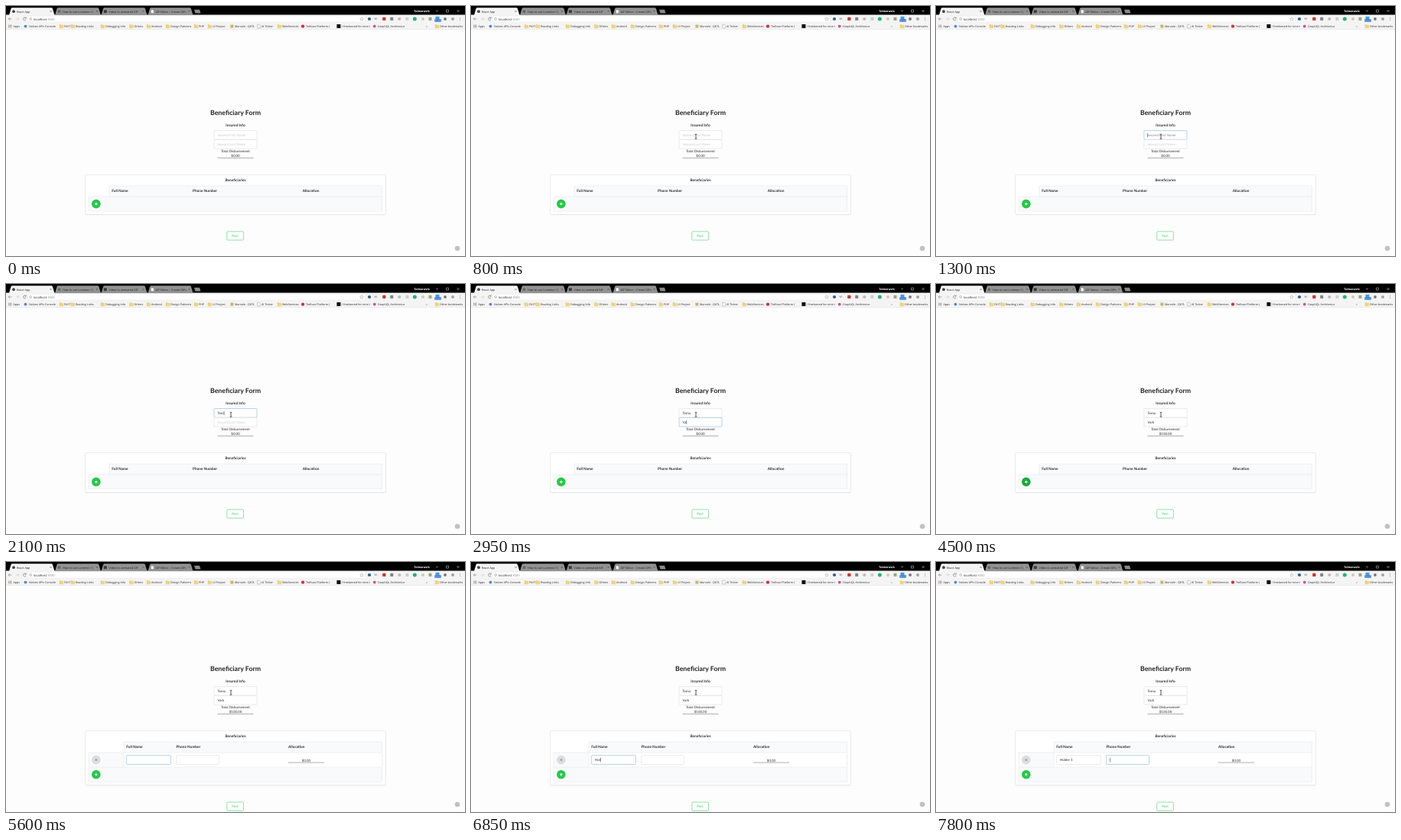
These frames come from a looping animation (600x328 px, 8 s). An HTML page:

```html
<!DOCTYPE html>
<html lang="en">
<head>
<meta charset="utf-8">
<title>Beneficiary Form</title>
<style>
  html, body { margin: 0; width: 100%; height: 100%; overflow: hidden; background: #fdfdfd; }
  svg { display: block; width: 100%; height: 100%; text-rendering: geometricPrecision; }
  .ui { font: 3.7px "Open Sans", "Noto Sans", sans-serif; }
  .page { font: 4.45px Lato, sans-serif; }
  .bold { font-size: 4.75px; font-weight: 700; }
</style>
</head>
<body>
<svg id="stage" viewBox="0 0 600 328" xmlns="http://www.w3.org/2000/svg"></svg>
<script>
const NS = 'http://www.w3.org/2000/svg';
const LOOP = 8000, BLINK = 280, FADE = 100;
const INK = '#2b2b2b', GREEN = '#21ca45', LINE = '#dededf', FOCUS = '#85b7d9';
const stage = document.getElementById('stage');

function el(parent, tag, attrs = {}, text) {
  const node = document.createElementNS(NS, tag);
  set(node, attrs);
  if (text !== undefined) node.textContent = text;
  parent.appendChild(node);
  return node;
}
function set(node, attrs) {
  for (const key in attrs) node.setAttribute(key, attrs[key]);
}
const group = (parent, cls) => el(parent, 'g', cls ? { class: cls } : {});
const rect = (p, x, y, width, height, fill, more) => el(p, 'rect', { x, y, width, height, fill, ...more });
const circle = (p, cx, cy, r, fill, more) => el(p, 'circle', { cx, cy, r, fill, ...more });
const path = (p, d, stroke, width = 0.6, fill = 'none') =>
  el(p, 'path', { d, stroke, fill, 'stroke-width': width });
const label = (p, x, y, text, fill = INK, more) => el(p, 'text', { x, y, fill, ...more }, text);
const middle = { 'text-anchor': 'middle' };

function drawFolder(p, x, y) {
  path(p, `M${x} ${y - 2}h1.7l.6 .7h2.4v3.6h-4.7z`, '#d9b550', 0.3, '#f6d36f');
}
function drawSheet(p, x, y) {
  path(p, `M${x} ${y - 2.3}h2.4l1.2 1.2v3.4h-3.6z`, '#777', 0.4, '#fff');
}

function drawTab(p, x, width, title, active) {
  path(p, `M${x} 12l2.6 -8.6q.5 -1.2 1.6 -1.2h${width - 8.4}q1.1 0 1.6 1.2l2.6 8.6z`, 'none', 0,
    active ? '#f4f4f4' : '#929292');
  label(p, x + 10, 8.5, title, '#1d1d1d');
  const cx = x + width - 5;
  path(p, `M${cx - 1} 6l2 2m0 -2l-2 2`, '#444', 0.45);
}

function drawBrowser() {
  const g = group(stage, 'ui');
  rect(g, 0, 0, 600, 12, '#000');
  rect(g, 0, 11.5, 600, 19.5, '#f4f4f4');
  rect(g, 0, 30.6, 600, 0.4, '#dcdcdc');

  drawTab(g, 64, 60, 'How to use Lumeron 1(');
  drawTab(g, 124.5, 60, 'Video to animated GIF');
  drawTab(g, 185.5, 59, 'GIF Editor – Create GIFs');
  drawTab(g, 4, 59.5, 'React App', true);
  circle(g, 10, 7.2, 1.9, '#3c464c');
  circle(g, 69.5, 7.2, 1.9, '#666');
  rect(g, 127.8, 5.3, 4, 3.8, '#3b3b3b');
  drawSheet(g, 189.5, 7.2);
  path(g, 'M246 4.8h7l1.5 4.7h-7z', 'none', 0, '#888');
  label(g, 543.5, 8, 'Tolmeravik', '#fff', { ...middle, 'font-weight': 700 });
  path(g, 'M562 6.5h3M575.5 5h3v3h-3zM589.5 5l3 3m0 -3l-3 3', '#ddd', 0.5);

  // Navigation row
  rect(g, 28.5, 13.2, 441, 7.7, '#fff', { rx: 1, stroke: '#e1e1e1', 'stroke-width': 0.3 });
  path(g, 'M7.4 17h-4m1.6 -1.7l-1.7 1.7 1.7 1.7', '#777', 0.6);
  path(g, 'M13 17h4m-1.6 -1.7l1.7 1.7 -1.7 1.7', '#c4c4c4', 0.6);
  path(g, 'M25.9 15.8a1.9 1.9 0 1 0 .1 2.3M26.2 14.6v1.6h-1.6', '#666', 0.6);
  circle(g, 32.2, 17, 1.6, 'none', { stroke: '#777', 'stroke-width': 0.4 });
  path(g, 'M32.2 16.7v1.2m0 -2v.4', '#777', 0.4);
  const url = label(g, 36, 18.5, 'localhost', '#222', { 'font-size': 4.1 });
  el(url, 'tspan', { fill: '#8a8a8a' }, ':3000');
  path(g, 'M465 14.7l.7 1.5 1.7.2 -1.2 1.1 .3 1.6 -1.5 -.8 -1.5.8 .3 -1.6 -1.2 -1.1 1.7 -.2z', '#777', 0.35);
  circle(g, 475, 17, 2.1, '#2e5f8f');
  label(g, 481.5, 18.3, 'W.', '#555');
  rect(g, 492.2, 14.8, 4.2, 4.2, '#c9372c', { rx: 0.6 });
  rect(g, 502.2, 14.8, 4, 4.2, '#858585', { rx: 0.6 });
  circle(g, 514.3, 17, 2.1, '#bdbdbd');
  rect(g, 522.4, 14.8, 4, 4.2, '#cfcfcf', { rx: 0.6 });
  circle(g, 534.3, 17, 2.5, '#21b573');
  circle(g, 545, 17, 2, '#cbc9b8');
  rect(g, 552.5, 14.8, 4, 4.2, '#9ea67e', { rx: 0.6 });
  rect(g, 561.5, 13.8, 5, 4, '#4a9ae0');
  rect(g, 560.3, 17.2, 8.5, 3.6, '#2b7cd3', { rx: 0.5 });
  label(g, 564.5, 20.1, '10:12', '#fff', { ...middle, 'font-size': 2.7 });
  circle(g, 574, 17, 1.9, '#777');
  circle(g, 584, 17, 2, '#a3a3a3');
  for (const y of [15.2, 17, 18.8]) circle(g, 593.5, y, 0.45, '#555');

  // Bookmarks
  const marks = [
    [9.5, 'Apps'], [30, 'Nolvex APIs Console'], [76, 'FAST', 1], [91, 'Reading Links', 1],
    [130, 'Debugging Info', 1], [167.5, 'Others', 1], [190, 'Android', 1],
    [215, 'Design Patterns', 1], [252, 'PHP', 1], [270, 'UI Project', 1],
    [299, 'Marvole - QKTL'], [334, 'AI Tinker'], [361, 'WebServices', 1],
    [392, 'Trellvue Platform ('], [439, 'I freelanced for nine t'],
    [486, 'GraphQL Architectur'], [567, 'Other bookmarks', 1]
  ];
  for (const [x, text, folder] of marks) {
    label(g, x, 27.9, text);
    if (folder) drawFolder(g, x - 6, 26.5);
  }
  const dots = ['#d84b40', '#e0a52b', '#3f86d8'];
  for (let i = 0; i < 9; i++) rect(g, 3.4 + i % 3 * 1.4, 24.7 + Math.floor(i / 3) * 1.4, 1, 1, dots[i % 3]);
  circle(g, 25.5, 26.6, 1.9, '#4c86dc');
  rect(g, 293.4, 24.6, 3.9, 4, '#c9b75c');
  drawSheet(g, 328.8, 26.6);
  circle(g, 388, 26.6, 2.2, '#d2323c');
  rect(g, 432.4, 24, 5, 5, '#111');
  circle(g, 481.7, 26.6, 1.9, '#d4489c');
  label(g, 549, 28, '»', '#555');
}

function makeInput(p, x, y, width, height, hint = '') {
  const box = rect(p, x, y, width, height, '#fff', { rx: 0.9, 'stroke-width': 0.6 });
  const base = y + height / 2 + 1.6;
  return {
    box, hint, left: x + 4.5,
    text: label(p, x + 4.5, base, ''),
    caret: rect(p, 0, base - 4.4, 0.5, 5.6, '#222')
  };
}
function makeMoney(p, cx, base) {
  return {
    cx,
    rule: rect(p, cx - 23.5, base + 1.2, 47, 0.6, '#777'),
    text: label(p, cx, base, '$0.00', INK, middle),
    caret: rect(p, 0, base - 4.2, 0.5, 5, '#222')
  };
}

function drawTable(left, rows, columns) {
  const g = group(stage, 'page');
  const end = 250 + rows * 19.2;
  rect(g, 104, 222, 392.4, end + 5 - 222, '#ececed', { rx: 1 });
  rect(g, 103.7, 221.5, 392.6, end + 4.4 - 221.5, '#fff', { rx: 1, stroke: '#d9d9da', 'stroke-width': 0.5 });
  label(g, 300, 230, 'Beneficiaries', INK, { ...middle, class: 'bold' });
  rect(g, left, 236, 491.5 - left, 14, '#f9fafb');
  rect(g, 108, 250, 383.5, end - 250, '#f9fafb');
  if (rows > 1) rect(g, left, 250, 491.5 - left, 19.2, '#fff');
  path(g, `M${left} 250V236H491.5V${end}H108V250H491.5`, '#dfe0e1', 0.45);
  if (rows > 1) path(g, `M108 269.2H491.5M${left} 250V269.2`, '#dfe0e1', 0.45);
  ['Full Name', 'Phone Number', 'Allocation'].forEach((name, i) =>
    label(g, columns[i], 244.4, name, INK, { class: 'bold' }));

  const cy = end - 9.6;
  const add = circle(g, 117.8, cy, 5.8, GREEN);
  path(g, `M115.9 ${cy}h3.8m-1.9 -1.9v3.8`, '#fff', 1.1);

  const py = end + 26.7;
  rect(g, 288.8, py, 21.6, 11.2, '#fff', { rx: 1, stroke: '#62d67d', 'stroke-width': 0.7 });
  label(g, 299.6, py + 7.2, 'Post', '#42c963', middle);
  return { g, add };
}

drawBrowser();
const form = group(stage, 'page');
label(form, 300, 142.6, 'Beneficiary Form', '#222', { ...middle, 'font-size': 8.75, 'font-weight': 700 });
label(form, 300, 157.7, 'Insured Info', INK, { ...middle, class: 'bold' });

const empty = drawTable(135, 1, [138.3, 244, 387.8]);
const filled = drawTable(154, 2, [157.3, 222.4, 369]);
circle(filled.g, 117.8, 259.6, 5.8, '#dcdddf');
path(filled.g, 'M116.6 258.4l2.4 2.4m0 -2.4l-2.4 2.4', '#777', 0.9);

const fields = {
  first: makeInput(form, 272, 163.5, 56, 11.7, 'Insured First Name'),
  last: makeInput(form, 272, 175.4, 56, 11.7, 'Insured Last Name'),
  total: makeMoney(form, 300, 197.7),
  name: makeInput(filled.g, 157.4, 253.7, 58, 11.8),
  phone: makeInput(filled.g, 222.6, 253.7, 56, 11.8),
  alloc: makeMoney(filled.g, 392.5, 261.6)
};
label(form, 300, 191.7, 'Total Disbursement', INK, middle);
circle(stage, 590, 318, 3.3, '#c2c2c2');
const pointer = path(stage, 'M292.7 168.2q1.3 0 1.3 .8 0 -.8 1.3 -.8M294 169v4.6M292.7 174.4q1.3 0 1.3 -.8 0 .8 1.3 .8', '#111', 0.7);

// Start time, field, and optional caret phase
const focusSteps = [
  [1050, 'first'], [2650, 'last'], [3500, 'total'], [4400, 'add'],
  [5100, 'alloc'], [5200, 'phone'], [5310, 'name'], [7375, 'phone', 7240]
];
const typing = {
  first: { text: 'Temo', keys: [1850, 1950, 2050, 2200] },
  last: { text: 'Vark', keys: [2800, 2950, 3100, 3250] },
  total: { keys: [3650, 3800, 3900, 4050, 4150] },
  name: { text: 'Holder 1', keys: [6650, 6800, 6850, 6950, 7000, 7050, 7100, 7300] }
};
const rowTime = 4800, pointerTime = 800;

function mix(a, b, k) {
  const part = (hex, i) => parseInt(hex.slice(i, i + 2), 16);
  return `rgb(${[1, 3, 5].map(i => Math.round(part(a, i) + (part(b, i) - part(a, i)) * k))})`;
}

function focusAmount(id, time) {
  let amount = 0;
  focusSteps.forEach(([start, field], i) => {
    const next = focusSteps[i + 1];
    if (field !== id || time < start) return;
    const rise = Math.min(1, (time - start) / FADE);
    const fall = next ? Math.min(1, Math.max(0, (time - next[0]) / FADE)) : 0;
    amount = Math.max(amount, rise - fall);
  });
  return amount;
}

function render(time) {
  const step = focusSteps.filter(s => s[0] <= time).pop();
  for (const id in fields) {
    const f = fields[id];
    const { text = '', keys = [] } = typing[id] || {};
    const pressed = keys.filter(k => k <= time);
    const count = pressed.length;
    const amount = focusAmount(id, time);
    const focused = step && step[1] === id;

    if (f.box) {
      f.text.textContent = count ? text.slice(0, count) : f.hint;
      f.text.setAttribute('fill', count ? INK : mix('#c9c9c9', '#858585', amount));
      f.box.setAttribute('stroke', mix(LINE, FOCUS, amount));
    } else {
      f.text.textContent = '$' + (count ? 10 ** (count - 1) / 100 : 0).toFixed(2);
      set(f.rule, { fill: mix('#777777', '#21ba45', amount), height: 0.6 + 0.8 * amount });
    }

    const since = focused ? time - Math.max(step[2] || step[0], ...pressed) : 0;
    const on = focused && Math.floor(since / BLINK) % 2 === 0;
    f.caret.setAttribute('visibility', on ? 'inherit' : 'hidden');
    if (on) {
      const width = f.text.getComputedTextLength();
      const x = f.box ? f.left + (count ? width + (text[count - 1] === ' ' ? 1 : 0.2) : 0) : f.cx + width / 2 + 0.3;
      f.caret.setAttribute('x', x);
    }
  }
  const hasRow = time >= rowTime;
  empty.g.setAttribute('visibility', hasRow ? 'hidden' : 'visible');
  filled.g.setAttribute('visibility', hasRow ? 'visible' : 'hidden');
  const addFill = mix(GREEN, '#16ab39', focusAmount('add', time));
  for (const table of [empty, filled]) table.add.setAttribute('fill', addFill);
  pointer.setAttribute('visibility', time >= pointerTime ? 'visible' : 'hidden');
}

const origin = performance.now();
function tick() {
  render((performance.now() - origin) % LOOP);
  requestAnimationFrame(tick);
}
tick();
</script>
</body>
</html>
```
